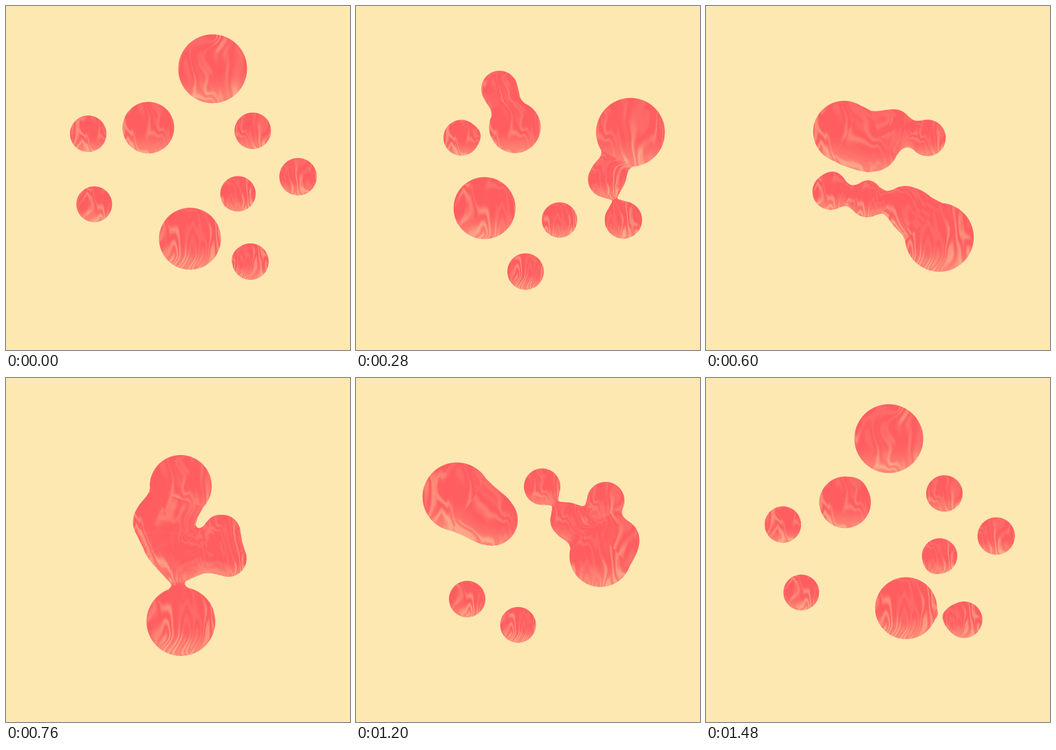
Recreate the animation shown at these times as an HTML page with a canvas. Size 500x500 px, loop 1520 ms.

```html
<!DOCTYPE html>
<html lang="en">
<head>
<meta charset="utf-8">
<title>Marbled drops</title>
<style>
  html, body { margin: 0; width: 100%; height: 100%; overflow: hidden; background: #fee8b2; }
  canvas { display: block; width: 100vw; height: 100vh; }
</style>
</head>
<body>
<canvas id="stage" width="500" height="500"></canvas>
<script>
const SIZE = 500, STEP = 40, STEPS = 38;
const BG = [254, 232, 178], DARK = [255, 90, 94], LIGHT = [252, 166, 136];
const K = 1.62;                     // falloff of the blob field
const REACH = K / (K - 1);

// orbit centre x, y, orbit radius, start angle, blob radius
const ORBITS = [
  [271, 221.5, 133.5, -77.3, 50],
  [219.4, 197, 23.7, -121.8, 37.5],
  [219.5, 229, 109, -156.6, 26.5],
  [301, 221, 70, -34.5, 26.5],
  [353, 249, 71.5, -0.7, 27.2],
  [223, 261, 98.6, 164, 26],
  [284, 256.7, 55.6, 17, 25.7],
  [265, 247.3, 91, 88.5, 45],
  [288.5, 286, 108.5, 52, 26.5]
];

const ctx = document.getElementById('stage').getContext('2d');
const image = ctx.createImageData(SIZE, SIZE);
const data = image.data;
const words = new Uint32Array(data.buffer);
const BLANK = (255 << 24 | BG[2] << 16 | BG[1] << 8 | BG[0]) >>> 0;

// seeded lattice for value noise
let seed = 20;
const lattice = Float32Array.from({ length: 4096 }, () => {
  seed = (Math.imul(seed, 1664525) + 1013904223) >>> 0;
  return seed / 4294967296;
});

const clamp = v => v < 0 ? 0 : v > 1 ? 1 : v;
const ease = (a, b, v) => { v = clamp((v - a) / (b - a)); return v * v * (3 - 2 * v); };

function noise(x, y) {
  const ix = Math.floor(x), iy = Math.floor(y);
  let u = x - ix, v = y - iy;
  u = u * u * (3 - 2 * u);
  v = v * v * (3 - 2 * v);
  const at = (i, j) => lattice[(i & 63) + (j & 63) * 64];
  const top = at(ix, iy) * (1 - u) + at(ix + 1, iy) * u;
  const low = at(ix, iy + 1) * (1 - u) + at(ix + 1, iy + 1) * u;
  return top * (1 - v) + low * v;
}

// all blobs turn at one even rate after a short first step
function blobsAt(step) {
  const turn = Math.max(0, step * 360 / STEPS - 5.5);
  return ORBITS.map(([cx, cy, orbit, start, r]) => {
    const a = (start + turn) * Math.PI / 180;
    return { x: cx + orbit * Math.cos(a), y: cy + orbit * Math.sin(a), rr: r * r };
  });
}

// share of the light tone for a surface normal at a place
function marble(nx, ny, x, y) {
  const lat = Math.asin(ny * 0.98);
  const u = Math.asin(nx * 0.98) * 1.3 + x * 0.011 + 7;
  const v = lat * 0.45 + y * 0.006 + 5;
  const wx = noise(u * 0.9 + 11, v * 1.9 + 3);
  const wy = noise(u * 0.9 + 29, v * 1.2 + 17);
  const p = u + (wx - 0.5) * 0.9, q = v + (wy - 0.5) * 0.7;
  const flow = noise(p * 1.5, q * 1.05);
  const fine = noise(p * 5 + 40, q * 1.6 + 9);
  const band = 0.5 + 0.5 * Math.sin(flow * 19 + fine * 2.6);
  const calm = ease(0.2, 0.7, noise(u * 1.4 + 50, v + 33) + ny * 0.15);
  const base = ease(0.1, 1, ny) * 0.5;
  return clamp(0.04 + Math.pow(band, 1.5) * (0.18 + 0.46 * calm) + base);
}

function draw(step) {
  const blobs = blobsAt(step);
  const near = [], dist = [];
  words.fill(BLANK);
  for (let y = 25; y < 440; y++) {
    for (let x = 70; x < 470; x++) {
      let field = 0, gx = 0, gy = 0, depth = 0, count = 0;
      for (const b of blobs) {
        const dx = x + 0.5 - b.x, dy = y + 0.5 - b.y;
        const d = dx * dx + dy * dy + 0.01;
        if (d > b.rr * REACH) continue;
        near[count] = b;
        dist[count++] = d;
        field += K * b.rr / d - K + 1;
        const g = 2 * K * b.rr / (d * d);
        gx += g * dx;
        gy += g * dy;
        depth = Math.max(depth, b.rr - d);
      }
      if (field < 0.85) continue;
      const cover = field > 1.6 ? 1 : clamp((field - 1) / (Math.hypot(gx, gy) + 1e-6) + 0.5);
      if (!cover) continue;

      // lift the pixel onto the surface: solve for squared depth
      for (let n = 0; n < 4 && field > 1; n++) {
        let f = -1, slope = 0;
        for (let i = 0; i < count; i++) {
          const d = dist[i] + depth, g = K * near[i].rr / d - K + 1;
          if (g > 0) {
            f += g;
            slope += K * near[i].rr / (d * d);
          }
        }
        if (slope < 1e-9) break;
        depth = Math.max(0, depth + f / slope);
      }
      let nx = 0, ny = 0, nz = 0;
      const z = Math.sqrt(depth);
      for (let i = 0; i < count; i++) {
        const b = near[i], d = dist[i] + depth;
        if (d > b.rr * REACH) continue;
        const w = b.rr / (d * d);
        nx += w * (x + 0.5 - b.x);
        ny += w * (y + 0.5 - b.y);
        nz += w * z;
      }
      const len = Math.hypot(nx, ny, nz) || 1;
      const tone = marble(nx / len, ny / len, x, y);
      const o = (y * SIZE + x) * 4;
      for (let c = 0; c < 3; c++) {
        const ink = DARK[c] + (LIGHT[c] - DARK[c]) * tone;
        data[o + c] = BG[c] + (ink - BG[c]) * cover;
      }
    }
  }
  ctx.putImageData(image, 0, 0);
}

let shown = -1;
function tick(now) {
  const step = Math.floor((now + 1) / STEP) % STEPS;
  if (step !== shown) draw(shown = step);
  requestAnimationFrame(tick);
}
draw(0);
requestAnimationFrame(tick);
</script>
</body>
</html>
```
